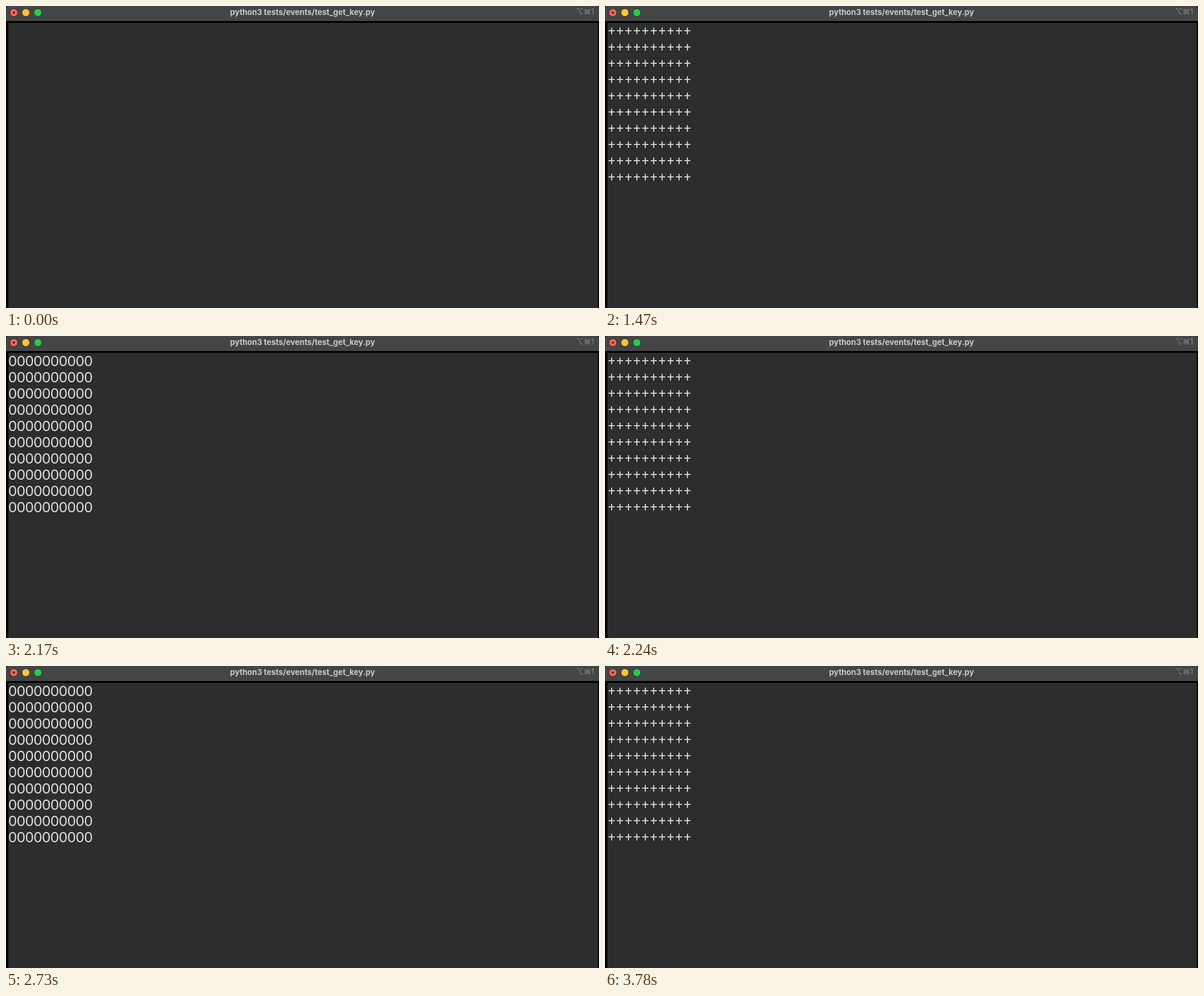
An HTML page for the animation above (3990 ms loop, 986 by 502 pixels).

```html
<!DOCTYPE html>
<html lang="en">
<head>
<meta charset="utf-8">
<title>Key test</title>
<style>
html, body { margin: 0; height: 100%; overflow: hidden; background: #000; }
svg { display: block; }
.bar { font-family: Inter, "DejaVu Sans", sans-serif; }
#grid { font: 23.333px "Noto Sans Mono", monospace; fill: #dcded9; }
</style>
</head>
<body>
<svg width="986" height="502" viewBox="0 0 986 502">
  <path d="M0 25V4Q0 0 4 0H982Q986 0 986 4V25Z" fill="#444546"/>
  <rect x="4" y="28" width="980" height="474" fill="#2d2d2d"/>
  <g stroke="#2b2c2d" stroke-width="1">
    <circle cx="13" cy="11" r="6.5" fill="#fc635b"/>
    <circle cx="33" cy="11" r="6.5" fill="#fdc237"/>
    <circle cx="53" cy="11" r="6.5" fill="#2ac94b"/>
  </g>
  <circle cx="13" cy="11" r="2" fill="#7d1511"/>
  <g class="bar">
    <text x="493" y="15" text-anchor="middle" font-size="13" font-weight="700" fill="#c9caca">python3 tests/events/test_get_key.py</text>
    <text x="978" y="14" text-anchor="end" font-size="12.5" font-weight="500" fill="#7f8081">⌥⌘1</text>
  </g>
  <g id="grid"></g>
</svg>
<script>
const LOOP = 3990, TICK = 70, SIZE = 10;
const FIRST_TICK = 11;
// Ticks during which the key is held down
const pressed = new Set([22, 25, 27, 29, 31, 39, 40, 42, 44, 46]);

const grid = document.getElementById("grid");
const rows = Array.from({ length: SIZE }, (_, i) => {
  const row = document.createElementNS("http://www.w3.org/2000/svg", "text");
  row.setAttribute("x", 4);
  row.setAttribute("y", 50 + 27 * i);
  return grid.appendChild(row);
});

let shown = "";

function draw() {
  const tick = Math.floor(performance.now() % LOOP / TICK);
  const char = tick < FIRST_TICK ? "" : pressed.has(tick) ? "O" : "+";
  if (char !== shown) {
    shown = char;
    for (const row of rows) row.textContent = char.repeat(SIZE);
  }
  requestAnimationFrame(draw);
}
draw();
</script>
</body>
</html>
```
